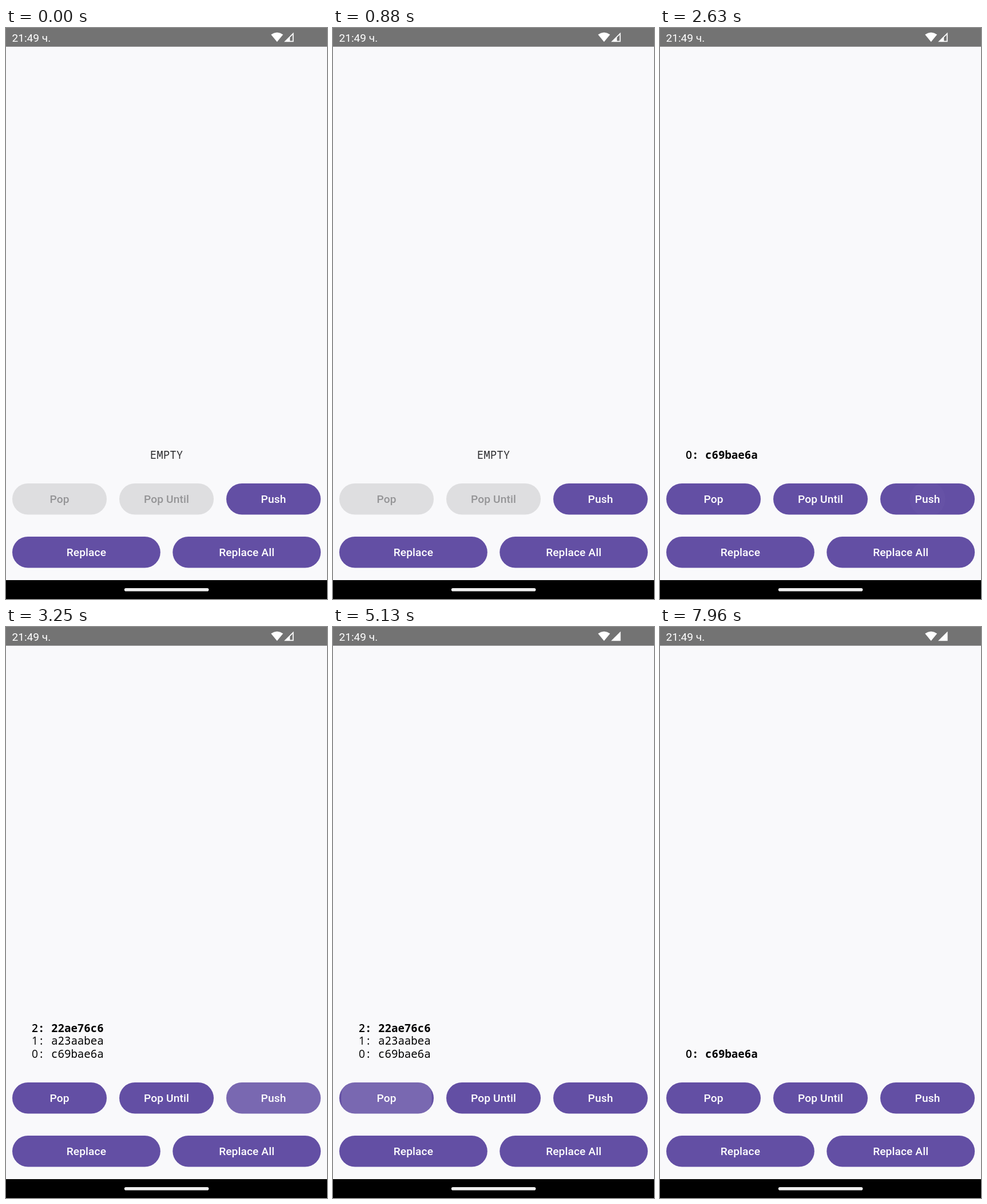
Write an HTML page that moves like this. It is 561x998 px and loops after 8 s.

```html
<!DOCTYPE html>
<html lang="en">
<head>
<meta charset="utf-8">
<title>Navigation stack</title>
<style>
  html, body { margin: 0; width: 100%; height: 100%; overflow: hidden; background: #f9f9fb; }
  svg { display: block; width: 100vw; height: 100vh; }
  text { font: 400 19.1px Roboto, sans-serif; }
  .button text { font-weight: 500; letter-spacing: .13px; text-anchor: middle; fill: #fff; }
  .button .shape { fill: #634fa4; }
  .button.disabled .shape { fill: #dedee0; }
  .button.disabled text { fill: #949496; }
  .ripple { fill: #fff; }
  .mono { font-family: "Noto Sans Mono", monospace; }
  #empty { text-anchor: middle; fill: #303033; }
  .row .index { font-family: "Open Sans", sans-serif; text-anchor: middle; }
  .row.top text { font-weight: 600; }
  .row.marked { fill: #e30d12; }
</style>
</head>
<body>
<svg viewBox="0 0 561 998">
  <rect width="561" height="998" fill="#f9f9fb"/>
  <rect width="561" height="32.7" fill="#737373"/>
  <text x="10.5" y="23.8" fill="#fff">21:49 ч.</text>
  <path d="M473.7 24.2 463.2 11.4Q473.7 4.2 484.2 11.4Z" fill="#fff"/>
  <path d="M486 24.3 502.6 7.8V24.3Z" fill="#fff"/>
  <path id="weak" d="M496.2 16.6 500.9 11.9V22.6H496.2Z" fill="#737373"/>
  <text id="empty" class="mono" x="280.5" y="752.8">EMPTY</text>
  <g id="rows"></g>
  <g id="buttons"></g>
  <rect y="965" width="561" height="33"/>
  <rect x="206.8" y="978.9" width="147.6" height="5.6" rx="2.8" fill="#efefef"/>
</svg>
<script>
const LOOP = 8000;
const SIGNAL_BACK = 4250;
const MARK_TIME = 6150;
const RELEASE = 80;
const ids = ["c69bae6a", "a23aabea", "22ae76c6", "7d5e93bf", "e84c26da"];

// Time of each press, by button.
const presses = {
  "Push": [2180, 2620, 3060, 3500, 3940],
  "Pop": [4560, 5000],
  "Pop Until": [7200]
};

const byId = id => document.getElementById(id);

function add(parent, tag, attrs, content = "") {
  const node = document.createElementNS("http://www.w3.org/2000/svg", tag);
  for (const key in attrs) node.setAttribute(key, attrs[key]);
  node.textContent = content;
  return parent.appendChild(node);
}

function makeButton(label, x, y, width) {
  const group = add(byId("buttons"), "g", { class: "button" });
  const shape = { x, y, width, height: 54.5, rx: 27.25 };
  const clipId = "clip" + byId("buttons").children.length;
  add(add(group, "clipPath", { id: clipId }), "rect", shape);
  add(group, "rect", { ...shape, class: "shape" });
  const centre = x + width / 2;
  const ripple = add(group, "circle", {
    class: "ripple", cx: centre, cy: y + 27.25, r: 0, "clip-path": `url(#${clipId})`
  });
  add(group, "text", { x: centre, y: y + 33.9 }, label);
  return { group, ripple, width, times: presses[label] || [] };
}

const pop = makeButton("Pop", 11, 796, 165);
const popUntil = makeButton("Pop Until", 198, 796, 165);
const push = makeButton("Push", 385, 796, 165);
makeButton("Replace", 11, 889, 258.8);
makeButton("Replace All", 291.3, 889, 258.8);

const rows = ids.map((id, i) => {
  const row = add(byId("rows"), "g", { class: "row" });
  const y = 752.8 - i * 22.4;
  add(row, "text", { class: "index", x: 50.5, y }, i);
  add(row, "text", { class: "mono", x: 56.1, y }, ": " + id);
  return row;
});

const clamp = v => Math.max(0, Math.min(1, v));
const countDone = (times, t) => times.filter(p => t >= p + RELEASE).length;

function drawRipple({ ripple, width, times }, t) {
  const age = t - (times.filter(p => p <= t).pop() ?? -LOOP);
  const grow = 1 - (1 - clamp(age / 225)) ** 2;
  const alpha = clamp(age / 75) * (1 - clamp((age - 240) / 180));
  ripple.setAttribute("r", width * (0.15 + 0.4 * grow));
  ripple.setAttribute("opacity", 0.14 * alpha);
}

function render(t) {
  const cleared = countDone(popUntil.times, t) > 0;
  const depth = cleared ? 1 : countDone(push.times, t) - countDone(pop.times, t);
  rows.forEach((row, i) => {
    row.style.display = i < depth ? "" : "none";
    row.classList.toggle("top", i === depth - 1);
    row.classList.toggle("marked", i === 0 && t >= MARK_TIME && !cleared);
  });
  byId("empty").style.display = depth ? "none" : "";
  byId("weak").style.display = t < SIGNAL_BACK ? "" : "none";
  for (const button of [pop, popUntil]) button.group.classList.toggle("disabled", !depth);
  for (const button of [pop, popUntil, push]) drawRipple(button, t);
}

const start = performance.now();
function tick() {
  render((performance.now() - start) % LOOP);
  requestAnimationFrame(tick);
}
tick();
</script>
</body>
</html>
```
